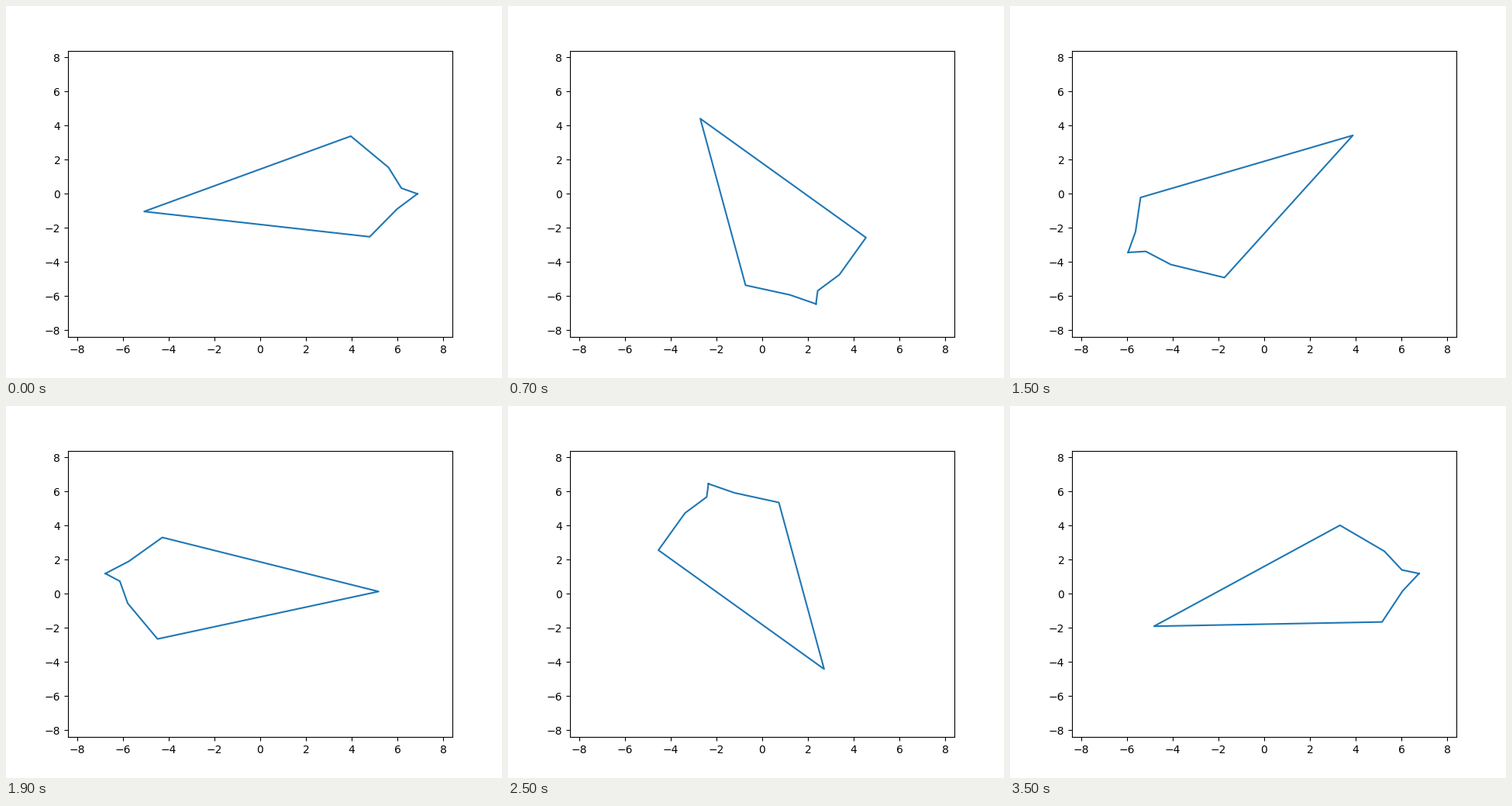
These frames come from a looping animation (640x480 px, 3600 ms). A matplotlib script:

```python
import numpy as np
import matplotlib.pyplot as plt
from matplotlib.animation import FuncAnimation

FRAMES = 36
LIMIT = 8.4

# Corners in the complex plane, starting at the tip
corners = [6.87, 6.17 + 0.335j, 5.607 + 1.55j, 3.96 + 3.385j,
           -5.072 - 1.034j, 4.787 - 2.517j, 5.982 - 0.888j]
outline = np.array(corners + corners[:1])

fig, ax = plt.subplots(figsize=(6.4, 4.8), dpi=100)
ax.set(xlim=(-LIMIT, LIMIT), ylim=(-LIMIT, LIMIT))
line, = ax.plot([], [])


def update(i):
    """Turn the outline clockwise, one full turn per loop."""
    turned = outline * np.exp(-2j * np.pi * i / FRAMES)
    line.set_data(turned.real, turned.imag)
    return line,


anim = FuncAnimation(fig, update, frames=FRAMES, interval=100, repeat=True)
plt.show()
```
